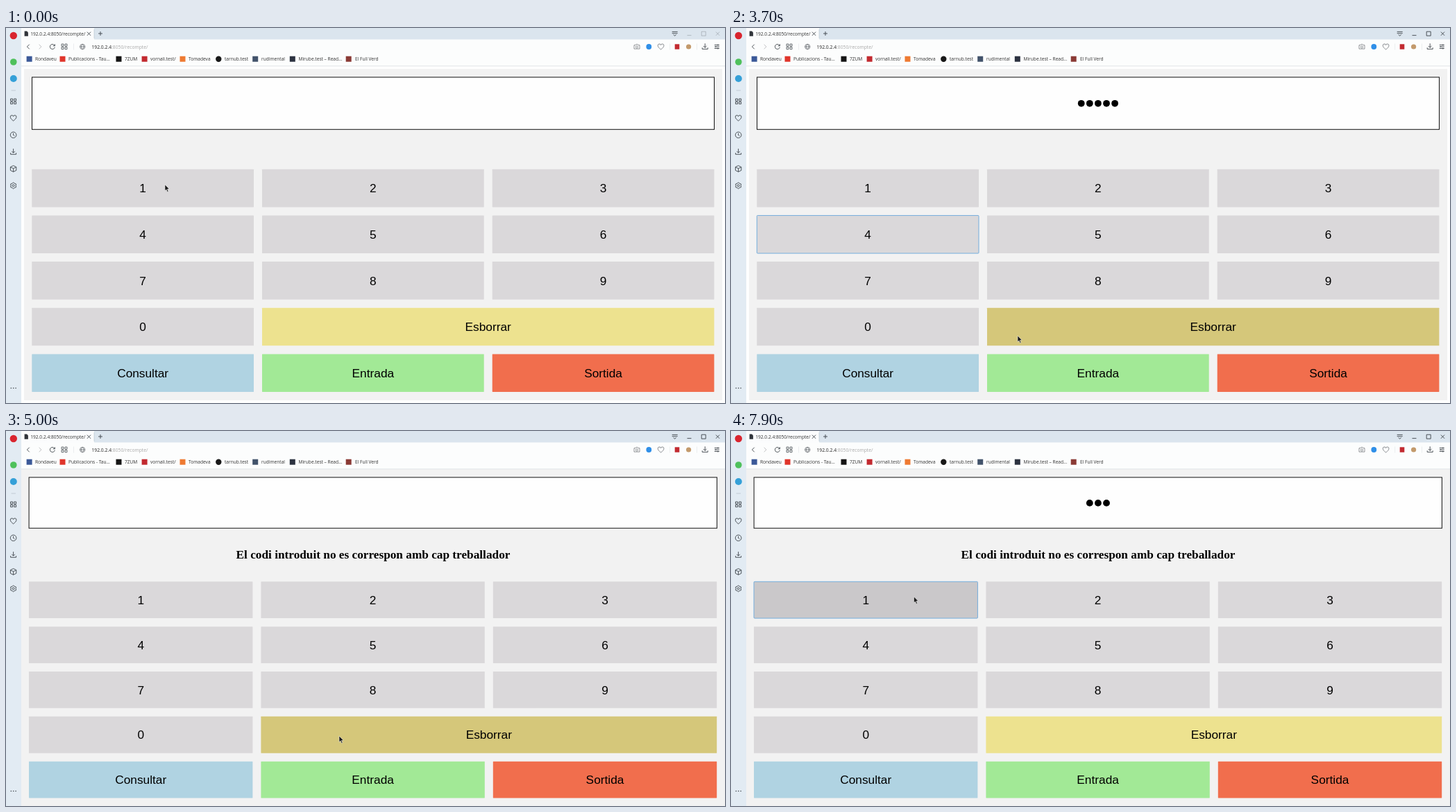
Write an HTML page that moves like this. It is 1036 px wide and 541 px high and loops after 8 s.

```html
<!DOCTYPE html>
<html lang="ca">
<head>
<meta charset="utf-8">
<title>Recompte</title>
<style>
  html, body { margin: 0; width: 100%; height: 100%; overflow: hidden; background: #fefefe; }
  svg { display: block; width: 100vw; height: 100vh; }
  text { white-space: pre; }
  .ui { font: 6.6px "Open Sans", sans-serif; fill: #333; }
  .key { font: 17.3px "Liberation Sans", Arial, sans-serif; text-anchor: middle; }
  .msg { font: bold 17.26px "Liberation Serif", "Times New Roman", serif; text-anchor: middle; }
  .line { fill: none; stroke: #3c4248; stroke-width: .9; }
</style>
</head>
<body>
<svg id="stage" viewBox="0 0 1036 541" preserveAspectRatio="none"></svg>
<script>
const LOOP = 8000, STEP = 100;
const stage = document.getElementById('stage');

function add(parent, tag, attrs = {}, text) {
  const el = document.createElementNS('http://www.w3.org/2000/svg', tag);
  for (const name in attrs) el.setAttribute(name, attrs[name]);
  if (text !== undefined) el.textContent = text;
  return parent.appendChild(el);
}
const rect = (x, y, width, height, fill, more, parent = stage) =>
  add(parent, 'rect', { x, y, width, height, fill, ...more });
const disc = (cx, cy, r, fill, parent = stage) => add(parent, 'circle', { cx, cy, r, fill });
const label = (x, y, text, cls = 'ui', more, parent = stage) =>
  add(parent, 'text', { x, y, class: cls, ...more }, text);
const icon = (x, y, d, more) =>
  add(stage, 'path', { d, class: 'line', transform: `translate(${x} ${y})`, ...more });

const shapes = {
  grid: 'M-4-3.5h3v3h-3zM1-3.5h3v3h-3zM-4 1h3v3h-3zM1 1h3v3h-3z',
  heart: 'M0 4C-2.5 2-4.3.4-4.3-1.5A2.2 2.2 0 0 1 0-2.4 2.2 2.2 0 0 1 4.3-1.5C4.3.4 2.5 2 0 4z',
  clock: 'M4.3 0A4.3 4.3 0 1 1-4.3 0 4.3 4.3 0 0 1 4.3 0M0-2.6V.2L1.8 1.4',
  download: 'M0-4.5V1.4M-2.3-.8 0 1.5 2.3-.8M-4 1.5V3.6H4V1.5',
  cube: 'M0-4.5 4.2-2.4V2.4L0 4.5-4.2 2.4V-2.4zM-4.2-2.4 0-.3 4.2-2.4M0-.3V4.5',
  cross: 'M-2.6-2.6 2.6 2.6M2.6-2.6-2.6 2.6',
  globe: 'M3.7 0A3.7 3.7 0 1 1-3.7 0 3.7 3.7 0 0 1 3.7 0M-3.7 0H3.7M0-3.7C-2.3-1.6-2.3 1.6 0 3.7 2.3 1.6 2.3-1.6 0-3.7',
  gear: 'M0-4.5 1.5-3.3 3.9-2.3 3.6 0 3.9 2.3 1.5 3.3 0 4.5-1.5 3.3-3.9 2.3-3.6 0-3.9-2.3-1.5-3.3zM1.5 0A1.5 1.5 0 1 1-1.5 0 1.5 1.5 0 0 1 1.5 0'
};

// Page body sits under the browser frame.
rect(22, 55, 1014, 486, '#fefefe');
const panel = rect(26, 59, 1006, 478, '#f2f2f2');

const keys = [...'123456789'].map((name, i) => ({ name, col: i % 3, row: Math.floor(i / 3) }));
keys.push({ name: '0', col: 0, row: 3 },
  { name: 'Esborrar', col: 1, row: 3, span: 2, fill: '#ede28f', hover: '#d5c77a' },
  { name: 'Consultar', col: 0, row: 4, fill: '#b0d3e2' },
  { name: 'Entrada', col: 1, row: 4, fill: '#a2e996', hover: '#6ea761' },
  { name: 'Sortida', col: 2, row: 4, fill: '#f16e4d' });

function buildPage({ box, x, y, w, h, dx, dy, dotY }) {
  const group = add(stage, 'g');
  rect(...box, '#fefefe', { stroke: '#111', 'stroke-width': 1 }, group);
  const dots = add(group, 'g');
  const buttons = {};
  for (const { name, col, row, span = 1, fill = '#dad8da', hover = '#cac8ca' } of keys) {
    const left = x + col * dx, top = y + row * dy, width = w + (span - 1) * dx;
    const el = rect(left, top, width, h, fill, { rx: .4 }, group);
    label(left + width / 2, top + h / 2 + 6.1, name, 'key', {}, group);
    buttons[name] = { el, fill, hover };
  }
  return { group, dots, buttons, dotY };
}
const plain = buildPage({ box: [37.5, 71, 983, 75.3],
  x: 37.3, y: 203.8, w: 319.7, h: 54.6, dx: 331.7, dy: 66.65, dotY: 108.8 });
const failed = buildPage({ box: [33.1, 66.9, 991.3, 73.3],
  x: 33, y: 217.3, w: 322.4, h: 52.8, dx: 334.4, dy: 64.85, dotY: 103.9 });
label(529, 184.3, 'El codi introduit no es correspon amb cap treballador', 'msg', {}, failed.group);

// Browser frame.
rect(0, 0, 1036, 17, '#dbe5ee');
rect(22, 0, 105, 17, '#fbfcfd');
rect(22, 16.5, 1014, 38.5, '#fcfdfd');
rect(22, 54.5, 1014, .8, '#d9dde1');
rect(0, 0, 22, 541, '#e2ebf3');
rect(126.7, 2, .7, 13, '#b9c5cf');

disc(10.8, 11, 5.2, '#d9252f');
disc(10.8, 49, 4.8, '#4fc15c');
disc(10.8, 73, 5, '#35a0d8');
rect(7.5, 89.7, 6.5, .7, '#b3bdc6');
['grid', 'heart', 'clock', 'download', 'cube', 'gear'].forEach((name, i) =>
  icon(10.6, 105.6 + i * 24.35, shapes[name]));
for (const x of [7.3, 10.7, 14.1]) disc(x, 519.5, .8, '#3c4248');

icon(29.2, 8.2, 'M-2.6-3.6H.9L2.7-1.8V3.6H-2.6z', { style: 'fill:#30343a;stroke:none' });
label(35.3, 10.6, '192.0.2.4:8050/recompte/');
icon(119.5, 8.3, shapes.cross);
icon(136, 8, 'M-3 0H3M0-3V3');
icon(963.7, 7.7, 'M-4-2.3H4M-4 0H4M-2 1.8 0 3.6 2 1.8');
const windowButtons = [
  icon(984.5, 8, 'M-3 2.6H3'),
  icon(1005.2, 8.2, 'M-3-3H3V3H-3z'),
  icon(1025.5, 8.2, shapes.cross)
];

icon(32, 27, 'M1.7-3.3-1.6 0 1.7 3.3');
icon(49.3, 27, 'M-1.7-3.3 1.6 0-1.7 3.3', { opacity: .35 });
icon(66.8, 27, 'M3.1-1.8A3.5 3.5 0 1 0 3.5.7M3.6-3.6V-1.2H1.1');
icon(84, 26.6, shapes.grid, { opacity: .85 });
icon(110.2, 27, shapes.globe, { opacity: .65 });
const url = label(123.5, 29.5, '', 'ui', { style: 'font-size:6.75px' });
add(url, 'tspan', { fill: '#222' }, '192.0.2.4');
add(url, 'tspan', { fill: '#aaa' }, ':8050/recompte/');

icon(909, 27, 'M-4-2.3H-2L-1.2-3.4H1.2L2-2.3H4V3.1H-4zM1.6.4A1.6 1.6 0 1 1-1.6.4 1.6 1.6 0 0 1 1.6.4', { opacity: .6 });
disc(926.3, 27, 3.9, '#2f8fe8');
icon(943.6, 27, shapes.heart, { opacity: .65 });
rect(963.7, 23.3, 6.6, 7.4, '#c22a30');
disc(983.6, 27, 3.6, '#c39a6c');
icon(1007.2, 26.8, shapes.download);
icon(1024.3, 27, 'M-3.5-2.5H3.5M-3.5 0H3.5M-3.5 2.5H3.5M1.5-3.5V-1.5M-1.5-1V1M1.5 1.5V3.5');
for (const x of [97, 956.5, 995]) rect(x, 22.5, .6, 9, '#dfe3e6');

const bookmarks = [
  [33.6, 42, '#3b5998', 'Rondaveu'],
  [81.5, 90, '#e0352b', 'Publicacions - Tau...'],
  [162.5, 171, '#151515', '7ZUM'],
  [199.6, 208, '#c22a30', 'vornali.test/'],
  [254.5, 263, '#ee7a32', 'Tomadeva'],
  [306.3, 315, '#181818', 'tarnub.test', true],
  [359.2, 368, '#42536b', 'rudimental'],
  [412.8, 421.5, '#2c3240', 'Mirube.test – Read...'],
  [493.7, 503, '#8a3a35', 'El Full Verd']
];
for (const [x, textX, fill, name, round] of bookmarks) {
  if (round) disc(x, 44.7, 4.2, fill);
  else rect(x - 4, 40.7, 8, 8, fill);
  label(textX, 47, name);
}

const focusRing = rect(0, 0, 0, 0, 'none', { rx: 1, stroke: '#74addc', 'stroke-width': 1 });
const cursor = add(stage, 'path', {
  d: 'M0 0V8.8L2 7 3.5 10.4 5 9.7 3.5 6.5 6.2 6.2z',
  fill: '#1c1c1c', stroke: '#fff', 'stroke-width': .5, 'stroke-linejoin': 'round'
});

// Timelines: [start in ms, value]
const activeAt = [[0, false], [700, true]];
const errorAt = [[0, false], [4300, true]];
const focusAt = [[0, ''], [700, '1'], [2300, '4'], [4100, 'Entrada'], [4300, ''], [6900, '1']];
const hoverAt = [[0, ''], [700, '1'], [2000, ''], [2300, '4'], [3400, ''], [3600, 'Esborrar'],
  [3800, ''], [3900, 'Entrada'], [4900, ''], [5000, 'Esborrar'], [5200, ''], [6900, '1']];
const dotsAt = [[0, 0], [800, 1], [1200, 2], [1700, 3], [2600, 4], [3100, 5],
  [4300, 0], [7300, 1], [7400, 2], [7900, 3]];
// Pointer keys: [ms, x, y]
const path = [[0, 229, 226], [100, 232, 229], [500, 196, 210], [1900, 196, 210], [2100, 201, 303],
  [3200, 201, 303], [3300, 206, 307], [3500, 270, 352], [3700, 413, 444], [3900, 458, 481],
  [4000, 462, 485], [4800, 462, 485], [5000, 480, 440], [5200, 530, 300], [5500, 575, 170],
  [5600, 580, 157], [5700, 583, 149], [5900, 559.5, 206], [6000, 480, 209], [6200, 280, 222],
  [6300, 191, 241], [6500, 285, 232], [6600, 293, 236], [6700, 263.5, 239], [LOOP, 263.5, 239]];

const valueAt = (table, t) => table.findLast(([start]) => start <= t)[1];

function pointerAt(t) {
  const i = path.findIndex(([end]) => end > t);
  const [t0, x0, y0] = path[i - 1], [t1, x1, y1] = path[i];
  const k = (t - t0) / (t1 - t0);
  return [x0 + (x1 - x0) * k, y0 + (y1 - y0) * k];
}

function render(t) {
  const error = valueAt(errorAt, t);
  const page = error ? failed : plain;
  plain.group.style.display = error ? 'none' : '';
  failed.group.style.display = error ? '' : 'none';
  for (const [name, value] of Object.entries(error
    ? { x: 22, y: 55.3, width: 1014, height: 486 }
    : { x: 26, y: 59, width: 1006, height: 478 })) panel.setAttribute(name, value);

  const active = valueAt(activeAt, t);
  windowButtons.forEach(el => el.setAttribute('opacity', active ? 1 : .3));

  const hovered = valueAt(hoverAt, t), focused = valueAt(focusAt, t);
  for (const name in page.buttons) {
    const { el, fill, hover } = page.buttons[name];
    el.setAttribute('fill', name === hovered ? hover : fill);
  }
  focusRing.style.display = focused ? '' : 'none';
  if (focused) for (const name of ['x', 'y', 'width', 'height'])
    focusRing.setAttribute(name, page.buttons[focused].el.getAttribute(name));

  const count = valueAt(dotsAt, t);
  page.dots.replaceChildren();
  for (let i = 0; i < count; i++)
    disc(528.9 + (i - (count - 1) / 2) * 12.1, page.dotY, 4.9, '#000', page.dots);

  cursor.setAttribute('transform', `translate(${pointerAt(t).join(' ')})`);
}

const start = performance.now();
function tick() {
  const t = (performance.now() - start) % LOOP;
  render(Math.floor(t / STEP) * STEP);
  requestAnimationFrame(tick);
}
tick();
</script>
</body>
</html>
```
